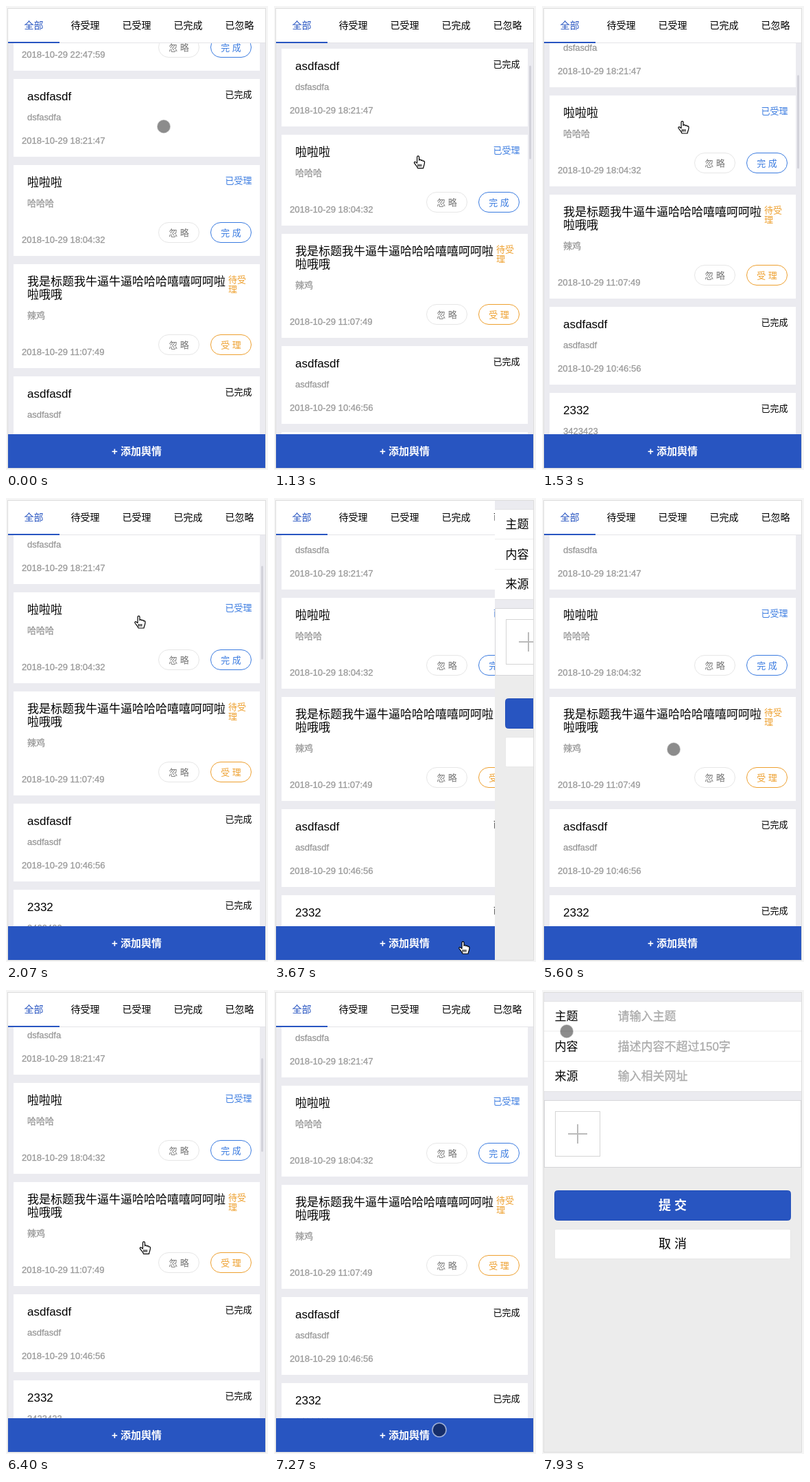
Recreate the animation shown at these times as an HTML page. Size 382 px wide and 674 px high, loop 8 s.

```html
<!DOCTYPE html>
<html lang="zh">
<head>
<meta charset="utf-8">
<style>
html, body { margin: 0; width: 100%; height: 100%; overflow: hidden; background: #f5f5f5; }
svg { display: block; width: 382px; height: 674px; }
text { font-family: "Liberation Sans", "Noto Sans CJK SC", "Noto Sans CJK", sans-serif; white-space: pre; }
.soft { stroke: currentColor; stroke-width: .3px; }
</style>
</head>
<body>
<svg id="stage" viewBox="0 0 382 674"></svg>
<script>
const LOOP = 8000;
const BLUE = '#2855c1', SKY = '#3a7be0', ORANGE = '#eea02f';
const GREY = '#999', GAP = '#ebebf0', INK = '#000';

const rect = (x, y, w, h, fill, extra = '') =>
  `<rect x="${x}" y="${y}" width="${w}" height="${h}" fill="${fill}" ${extra}/>`;
const outline = (x, y, w, h, fill, stroke, r = 0) =>
  rect(x + .5, y + .5, w - 1, h - 1, fill, `stroke="${stroke}" rx="${r}"`);
const text = (s, x, y, size, fill, { anchor = 'start', weight = 400, soft = false } = {}) =>
  `<text x="${x}" y="${y}" font-size="${size}" fill="${fill}" color="${fill}" text-anchor="${anchor}"
    font-weight="${weight}" ${soft ? 'class="soft"' : ''}>${s}</text>`;
const middle = { anchor: 'middle' };

function pill(label, x, y, border, color) {
  return outline(x, y, 60, 30, '#fff', border, 14.5) +
    text(label, x + 30, y + 19.7, 13, color, { ...middle, weight: 500 });
}

const STATES = {
  done: { label: ['已完成'], color: INK },
  taken: { label: ['已受理'], color: SKY, action: '完 成' },
  waiting: { label: ['待受', '理'], color: ORANGE, action: '受 理' }
};

function card({ y, h, state, title, body, date }) {
  const { label, color, action } = STATES[state];
  const weight = action ? 500 : 400;
  const bottom = y + h;
  let out = rect(11, y, 359, h, '#fff');
  title.forEach((line, i) => out += text(line, 31, y + 31 + i * 19, 17, INK));
  label.forEach((line, i) => out += label.length > 1
    ? text(line, 324, y + 27 + i * 14, 13, color, { weight })
    : text(line, 358.5, y + 27, 13, color, { weight, anchor: 'end' }));
  out += text(body, 31, y + 60 + (title.length - 1) * 19, 13, GREY, { soft: true });
  out += text(date, 23, bottom - 19, 13.1, GREY, { soft: true });
  if (action) {
    out += pill('忽 略', 222, bottom - 49, '#e6e6e6', '#777');
    out += pill(action, 298, bottom - 49, color, color);
  }
  return out;
}

const CARDS = [
  { y: -38, h: 132, state: 'taken', title: [''], body: '', date: '2018-10-29 22:47:59' },
  { y: 106, h: 113, state: 'done', title: ['asdfasdf'], body: 'dsfasdfa', date: '2018-10-29 18:21:47' },
  { y: 231, h: 132, state: 'taken', title: ['啦啦啦'], body: '哈哈哈', date: '2018-10-29 18:04:32' },
  { y: 375, h: 151, state: 'waiting', title: ['我是标题我牛逼牛逼哈哈哈嘻嘻呵呵啦', '啦哦哦'], body: '辣鸡', date: '2018-10-29 11:07:49' },
  { y: 538, h: 113, state: 'done', title: ['asdfasdf'], body: 'asdfasdf', date: '2018-10-29 10:46:56' },
  { y: 663, h: 113, state: 'done', title: ['2332'], body: '3423423', date: '' }
];

const tabs = ['全部', '待受理', '已受理', '已完成', '已忽略'].map((s, i) =>
  text(s, 40.5 + i * 75, 33, 14, i ? INK : BLUE, middle)).join('');

const listPage =
  rect(3, 4, 375, 667, GAP) +
  `<g id="cards">${CARDS.map(card).join('')}</g>` +
  rect(372, 0, 3, 136, '#d2d2da', 'id="thumb" rx="1.5"') +
  rect(3, 4, 375, 49, '#fff') + rect(3, 53, 375, 1, '#e4e4e8') +
  tabs + rect(3, 52, 75, 2, BLUE) +
  rect(3, 622, 375, 49, BLUE) +
  text('+ 添加舆情', 190.5, 652, 15, '#fff', { ...middle, weight: 700 });

const fields = [['主题', '请输入主题'], ['内容', '描述内容不超过150字'], ['来源', '输入相关网址']]
  .map(([label, hint], i) => {
    const y = 44 + i * 43.5;
    return text(label, 18.5, y, 17, INK) + text(hint, 110.5, y, 17, '#aaa', { soft: true }) +
      (i ? rect(3, 15.5 + i * 43.8, 375, 1, '#ebebeb') : '');
  }).join('');

const formPage =
  rect(3, 4, 375, 667, '#ececec') +
  rect(3, 4, 375, 157, GAP) +
  rect(3, 16, 375, 132, '#e2e2e5') + rect(3, 17, 375, 130, '#fff') + fields +
  outline(3, 160, 375, 98, '#fff', '#d6d6d9') +
  outline(19, 176, 66, 66, '#fff', '#d5d5d5') +
  rect(38, 208, 28, 2, '#bbb') + rect(51, 195, 2, 28, '#bbb') +
  outline(18, 291, 345, 44, BLUE, '#2450b8', 4) +
  text('提 交', 190.5, 319, 18, '#fff', { ...middle, weight: 700 }) +
  outline(18, 347, 345, 44, '#fff', '#e8e8e8', 2) +
  text('取 消', 190.5, 375, 18, INK, middle);

const pointers =
  `<circle id="dot" r="10" fill="#000" fill-opacity=".45" stroke="#fff" stroke-opacity=".55" stroke-width="1.6"/>
  <path id="hand" d="M-3 1.5V-7C-3-9.3 0-9.3 0-7V-2.5C.5-4 3-3.7 3-2C3.7-3.2 5.5-2.8 5.6-1.2
    C6.5-2 8-1.3 8 .2C8 4 6.5 5.5 6 9H-2C-2.5 6.5-5 4.5-7 1.5C-7.7 0-6-1-4.8.2ZM.5 3V6.5M2.7 3V6.5M-1.6 3V6.5"
    fill="#fff" stroke="#000" stroke-width="1.2" stroke-linejoin="round"/>`;

document.getElementById('stage').innerHTML =
  `<clipPath id="screen">${rect(3, 4, 375, 667, '#000')}</clipPath>
  ${outline(2, 3, 377, 669, '#fff', '#dcdcdc')}
  <g clip-path="url(#screen)">${listPage}<g id="form">${formPage}</g></g>${pointers}`;

// Tracks: [time, value, ...], eased between neighbours.
const SCROLL = [[910, 0], [1400, -103], [1530, -101], [2070, -94], [2450, -86],
  [6150, -86], [6500, -98], [6900, -92]];
const THUMB = [[930, 0], [1000, 1], [2400, 1], [2580, 0], [6150, 0], [6220, 1], [6900, 1], [7080, 0]];
const FORM = [[3610, 375], [3860, 0], [5150, 0], [5430, 375], [7690, 375], [7920, 0]];
const POINTER = [[0, 230, 175], [300, 229, 185], [870, 216, 277], [1400, 207, 174], [1530, 206, 176],
  [2070, 195, 180], [2450, 194, 190], [2670, 197, 205], [3400, 277, 653], [3850, 277, 653],
  [4900, 192, 367], [5600, 192, 365], [6130, 200, 385], [6500, 203, 372], [6850, 206, 379],
  [7200, 241, 639], [7690, 241, 639], [7920, 36, 60]];
const HAND = [[910, 3980], [6150, 6900]];

function sample(track, t) {
  const next = track.findIndex(k => k[0] > t);
  if (next === 0) return track[0].slice(1);
  if (next < 0) return track[track.length - 1].slice(1);
  const a = track[next - 1], b = track[next];
  const p = (t - a[0]) / (b[0] - a[0]);
  const e = p * p * (3 - 2 * p);
  return a.slice(1).map((v, i) => v + (b[i + 1] - v) * e);
}

const [cards, thumb, form, dot, hand] =
  ['cards', 'thumb', 'form', 'dot', 'hand'].map(id => document.getElementById(id));
const move = (el, x, y) => el.setAttribute('transform', `translate(${x} ${y})`);

function render(t) {
  const scroll = Math.round(sample(SCROLL, t)[0]);
  const [x, y] = sample(POINTER, t);
  const pressed = HAND.some(([from, to]) => t >= from && t < to);
  move(cards, 0, scroll);
  move(thumb, 0, 76 - scroll * .2395);
  thumb.setAttribute('opacity', sample(THUMB, t)[0]);
  move(form, Math.round(sample(FORM, t)[0]), 0);
  move(dot, x, y);
  move(hand, x, y);
  dot.setAttribute('visibility', pressed ? 'hidden' : 'visible');
  hand.setAttribute('visibility', pressed ? 'visible' : 'hidden');
}

const start = performance.now();
function tick() {
  render((performance.now() - start) % LOOP);
  requestAnimationFrame(tick);
}
tick();
</script>
</body>
</html>
```
